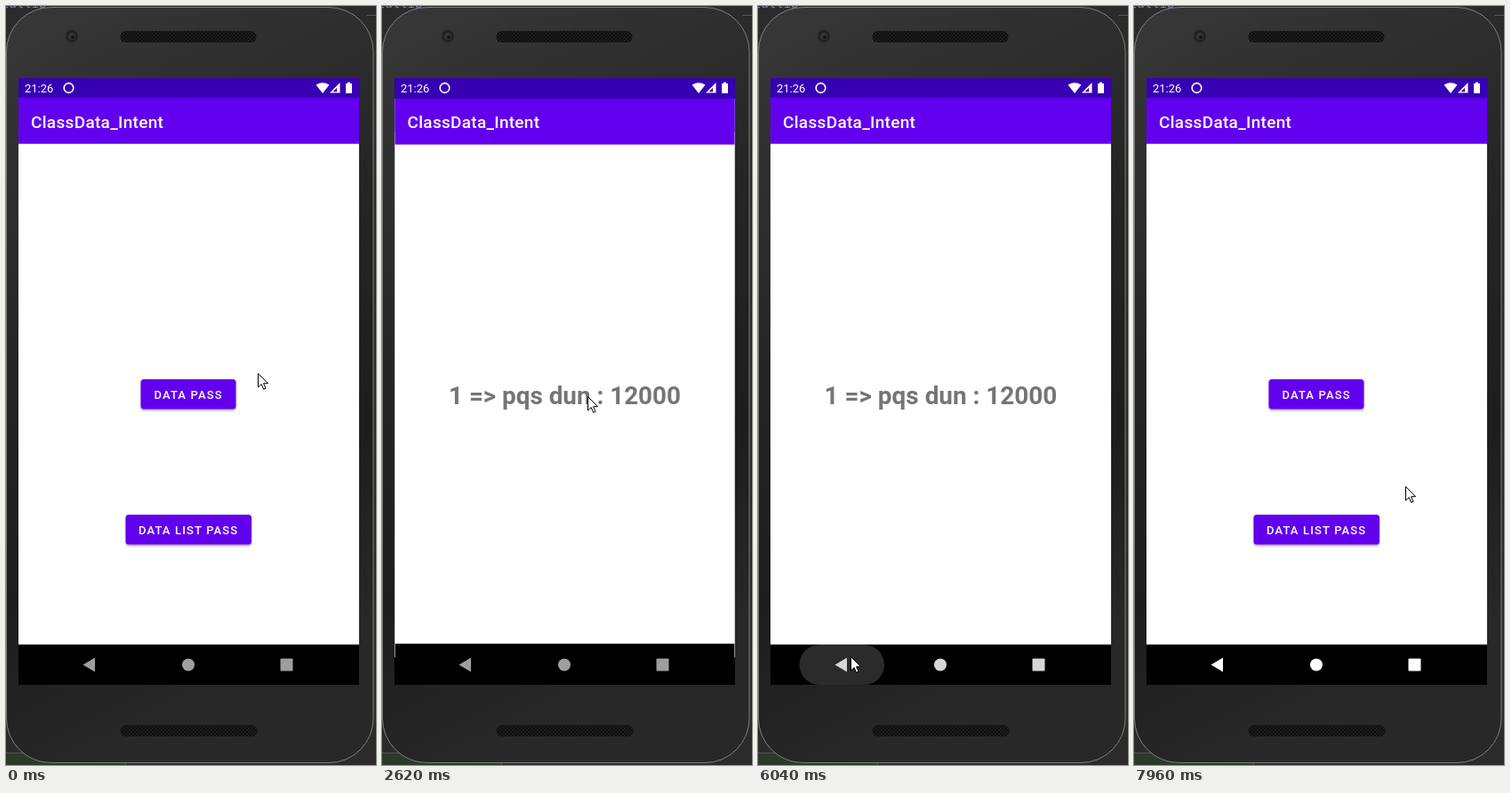
An HTML page that plays this animation: 416 by 852 pixels, repeating every 8 s.

```html
<!DOCTYPE html>
<html lang="en">
<head>
<meta charset="utf-8">
<title>Phone demo</title>
<style>
html, body { margin: 0; width: 100%; height: 100%; overflow: hidden; background: #2b2b2b; }
svg { display: block; width: 416px; height: 852px; font-family: Roboto, sans-serif; }
.title { font: 500 19px Roboto, sans-serif; letter-spacing: .3px; fill: #fff; }
.label { font: 500 13px Roboto, sans-serif; letter-spacing: 1.16px; fill: #fff; }
.result { font: 700 27.900px Roboto, sans-serif; fill: #757575; text-anchor: middle; }
.code { font: 14px "DejaVu Sans Mono", monospace; fill: #9876aa; }
</style>
</head>
<body>
<svg viewBox="0 0 416 852">
  <defs>
    <linearGradient id="body" x2=".25" y2="1">
      <stop offset="0" stop-color="#383838"/>
      <stop offset=".45" stop-color="#252525"/>
      <stop offset=".75" stop-color="#1d1d1d"/>
      <stop offset="1" stop-color="#282828"/>
    </linearGradient>
    <pattern id="mesh" width="4" height="4" patternUnits="userSpaceOnUse">
      <rect width="4" height="4" fill="#1d1d1d"/>
      <circle cx="1" cy="1" r="1" fill="#080808"/>
      <circle cx="3" cy="3" r="1" fill="#080808"/>
    </pattern>
    <filter id="shadow" x="-10%" y="-20%" width="120%" height="150%">
      <feDropShadow dx="0" dy="1.5" stdDeviation="1" flood-opacity=".35"/>
    </filter>
    <clipPath id="screen"><rect x="14" y="81" width="383" height="681"/></clipPath>
    <clipPath id="button"><rect x="151.500" y="419" width="107" height="33.500" rx="3.500"/></clipPath>
    <g id="window">
      <rect x="14" y="81" width="383" height="681"/>
      <rect x="14" y="103" width="383" height="613.700" fill="#fff"/>
      <rect x="14" y="81" width="383" height="22" fill="#3700b3"/>
      <rect x="14" y="103" width="383" height="51.700" fill="#6200ee"/>
      <text class="title" x="28" y="136.500">ClassData_Intent</text>
    </g>
  </defs>

  <!-- desktop and phone body -->
  <rect width="416" height="852" fill="#2b2b2b"/>
  <text class="code" x="-5" y="2">tallip</text>
  <rect y="838" width="134" height="14" fill="#2b3a2b"/>
  <path d="M0 838.500H20M134.500 846V852M405 10.500H416" stroke="#555"/>
  <rect x=".5" y="1.500" width="412.500" height="848" rx="50" fill="url(#body)" stroke="#808080"/>
  <circle cx="74" cy="34" r="7" fill="#222"/>
  <circle cx="74" cy="34" r="4" fill="#343434"/>
  <circle cx="75" cy="35" r="2" fill="#151515"/>
  <rect x="128.500" y="28" width="153" height="13" rx="6" fill="url(#mesh)"/>
  <rect x="128.500" y="807" width="154" height="13" rx="6" fill="url(#mesh)"/>

  <g clip-path="url(#screen)">
    <rect x="14" y="81" width="383" height="681"/>
    <g id="home">
      <use href="#window"/>
      <g fill="#6200ee" filter="url(#shadow)">
        <rect x="151.500" y="419" width="107" height="33.500" rx="3.500"/>
        <rect x="134.500" y="571" width="141.500" height="33.500" rx="3.500"/>
      </g>
      <circle id="tap" cx="231" cy="438" fill="#fff" opacity=".24" clip-path="url(#button)"/>
      <text class="label" x="166.500" y="441">DATA PASS</text>
      <text class="label" x="149" y="593">DATA LIST PASS</text>
    </g>
    <g id="detail">
      <use href="#window"/>
      <text class="result" x="205.500" y="447">1 =&gt; pqs dun : 12000</text>
    </g>

    <!-- status bar -->
    <g fill="#fff">
      <text x="21" y="97" font-size="13">21:26</text>
      <circle cx="70.500" cy="92" r="5.300" fill="none" stroke="#fff" stroke-width="1.700"/>
      <path d="M348.500 88.500Q356 83.500 363.500 88.500L356 98Z"/>
      <path d="M375.500 86V97.500H364ZM374 90L367.500 96.300H372V92Z" fill-rule="evenodd"/>
      <path d="M384 85.500H387V87H389V98H382V87H384Z"/>
    </g>

    <rect id="press" x="46.500" y="717" width="95.500" height="45" rx="22.500" fill="#fff"/>
    <g id="nav">
      <path d="M86.500 739.500L100 731.500V747.500Z"/>
      <circle cx="205" cy="739.500" r="7"/>
      <rect x="308.500" y="732.500" width="14" height="14" rx="1"/>
    </g>
  </g>

  <g id="cursor">
    <circle id="click" r="12" fill="#ff0" opacity=".47"/>
    <path d="M.5.5V16L4.200 12.600 6.600 18.300 9 17.200 6.600 11.700H11.500Z" fill="#fff" stroke="#000"/>
  </g>
</svg>
<script>
const LOOP = 8000, TICK = 75;
const el = id => document.getElementById(id);
const clamp = v => Math.min(1, Math.max(0, v));
const steps = (t, start, n) => Math.min(n, Math.max(0, Math.floor((t - start) / TICK) + 1));

const smooth = p => p * p * (3 - 2 * p);
const speedUp = p => p * p;
const slowDown = p => p * (2 - p);

// start time, number of steps, end x, end y, easing
const moves = [
  [1070, 9, 231, 439, smooth], [2160, 1, 231, 438, smooth], [3150, 1, 231, 437, smooth],
  [3320, 2, 231, 435, smooth], [3700, 4, 233, 428, smooth], [4100, 4, 270, 492, speedUp],
  [4400, 2, 261, 512, slowDown], [4710, 1, 261, 513, smooth], [5110, 9, 104, 730, smooth],
  [6270, 3, 178, 626, speedUp], [6500, 3, 303, 524, slowDown], [6730, 2, 319, 513, slowDown],
  [7650, 5, 305, 539, smooth]
];
const clicks = [2160, 5890, 7040];

function pointer(t) {
  let x = 283, y = 412;
  for (const [start, n, toX, toY, ease] of moves) {
    const p = ease(steps(t, start, n) / n);
    x += (toX - x) * p;
    y += (toY - y) * p;
  }
  return [Math.round(x), Math.round(y)];
}

const bezier = (a, b, c, d, u) =>
  a * (1 - u) ** 3 + 3 * b * u * (1 - u) ** 2 + 3 * c * u * u * (1 - u) + d * u ** 3;

// Android's fast-out, extra-slow-in curve: two joined beziers
function windowEase(p) {
  const early = p < 1 / 6;
  const xs = early ? [0, .05, 2 / 15, 1 / 6] : [1 / 6, 5 / 24, .25, 1];
  const ys = early ? [0, 0, .06, .4] : [.4, .82, 1, 1];
  let u = .5;
  for (let size = .25; size > 1e-4; size /= 2) u += bezier(...xs, u) < p ? size : -size;
  return bezier(...ys, u);
}

function show(id, scale, alpha) {
  el(id).setAttribute("transform", `translate(205.5 421.5) scale(${scale}) translate(-205.5 -421.5)`);
  el(id).setAttribute("opacity", alpha);
}

function draw(t) {
  const open = steps(t, 2160, 9) * 76 + 2084;
  const close = steps(t, 5890, 11) * 76 + 5814;

  if (t < 5890) {
    const since = open - 2360, p = clamp(since / 400);
    const rest = p < 1 ? 1 - windowEase(p) : 0;
    show("home", 1.05 - .05 * rest, 1);
    show("detail", 1 - .15 * rest, clamp((since - 50) / 50));
  } else {
    const since = close - 6051, p = clamp(since / 400);
    const rest = p < 1 ? 1 - windowEase(p) : 0;
    show("home", 1 + .1 * rest, 1);
    show("detail", 1 - .1 * (1 - rest), 1 - clamp((since - 35) / 50));
  }

  el("tap").setAttribute("r", open < 2160 || t > 2800 ? 0 : (open - 2140) * .5);
  const hold = t < 5890 ? 0 : clamp((close - 5850) / 100) * clamp((6300 - close) / 200);
  el("press").setAttribute("opacity", .17 * hold);
  const grey = 158 + 97 * clamp((close - 5850) / 330);
  el("nav").setAttribute("fill", `rgb(${grey},${grey},${grey})`);

  el("cursor").setAttribute("transform", `translate(${pointer(t)})`);
  el("click").setAttribute("visibility", clicks.some(c => t >= c && t < c + 150) ? "visible" : "hidden");
}

const begin = performance.now();
function frame() {
  draw((performance.now() - begin) % LOOP);
  requestAnimationFrame(frame);
}
frame();
</script>
</body>
</html>
```
